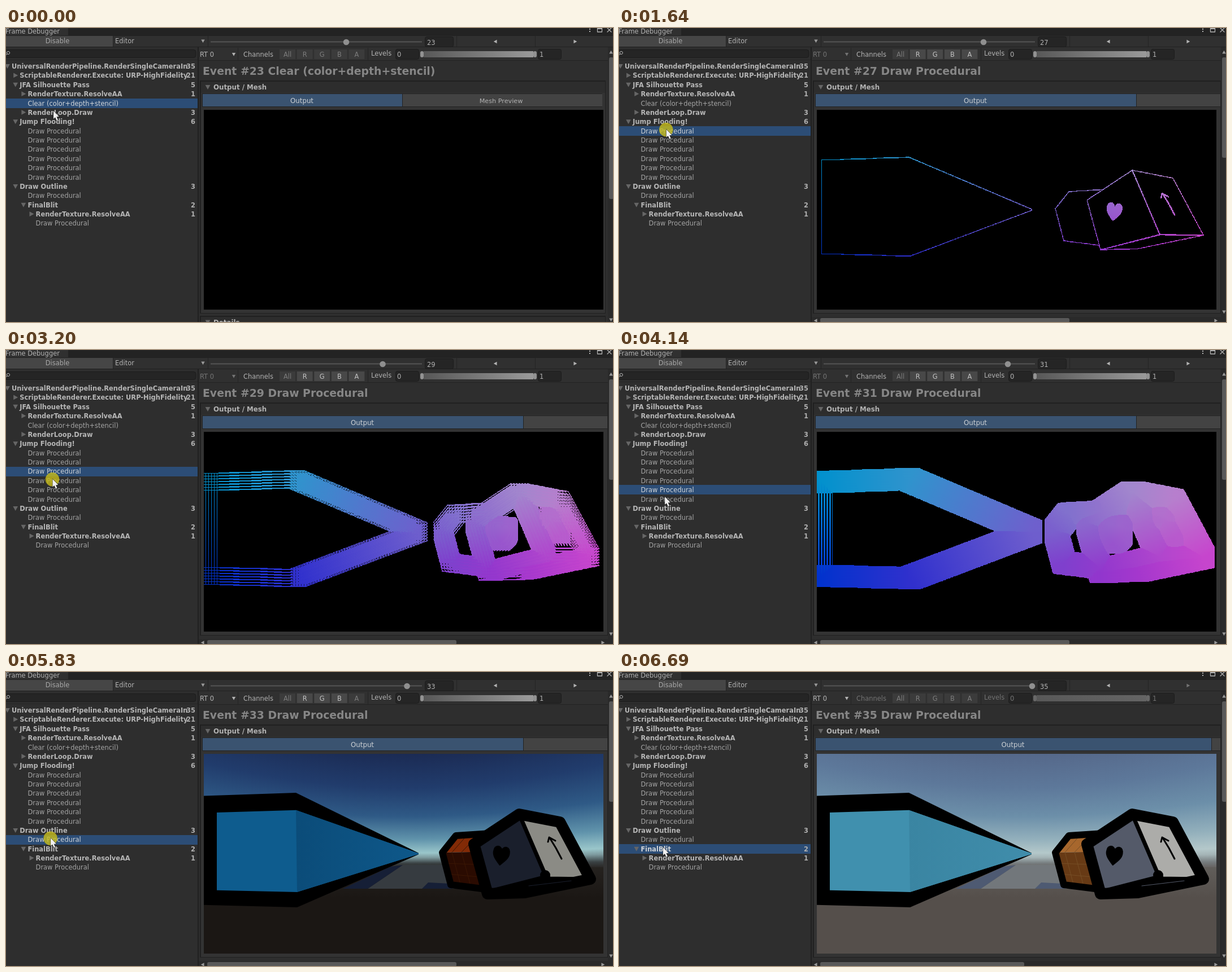
Write an HTML page with a canvas that moves like this. It is 1074 px wide and 521 px high and loops after 7920 ms.

```html
<!DOCTYPE html>
<html lang="en">
<head>
<meta charset="utf-8">
<title>Frame Debugger</title>
<style>
html, body { margin: 0; width: 100%; height: 100%; overflow: hidden; background: #2d2d2d; }
canvas { display: block; width: 1074px; height: 521px; }
</style>
</head>
<body>
<canvas id="stage" width="1074" height="521"></canvas>
<script>
const g = document.getElementById('stage').getContext('2d');
const LOOP = 7920;
const VIEW = { x: 350, y: 145, w: 707, h: 354 };
const ZOOM = 1.6;                                   // texels per stage pixel
const TW = Math.round(VIEW.w * ZOOM), TH = Math.round(VIEW.h * ZOOM);
const INK = '#b2b2b2', DIM = '#737373', FIELD = '#252525', EDGE = '#1c1c1c';

// ---------- helpers ----------
function rect(x, y, w, h, c) { g.fillStyle = c; g.fillRect(x, y, w, h); }
function round(x, y, w, h, r, c, line) {
  g.beginPath(); g.roundRect(x, y, w, h, r);
  g.fillStyle = c; g.fill();
  if (line) { g.strokeStyle = line; g.lineWidth = 1; g.stroke(); }
}
function text(s, x, y, c = INK, bold = false, size = 11.45, align = 'left') {
  g.font = `${bold ? 'bold ' : ''}${size}px "DejaVu Sans", sans-serif`;
  g.textAlign = align; g.fillStyle = c;
  g.fillText(s, x, y);
}
function path(c, pts, close) {
  c.beginPath();
  pts.forEach(p => c.lineTo(...p));
  if (close) c.closePath();
}
function fill(pts, color) { path(g, pts, true); g.fillStyle = color; g.fill(); }
function line(c, pts, color, w) {
  path(c, pts);
  c.strokeStyle = color; c.lineWidth = w; c.lineCap = c.lineJoin = 'round';
  c.stroke();
}
function disc(x, y, r, c) {
  g.beginPath(); g.arc(x, y, r, 0, 7);
  g.fillStyle = c; g.fill();
}
function tri(x, y, dir, c = '#9a9a9a', r = 3.3) {
  const a = ['right', 'down', 'left', 'up'].indexOf(dir) * Math.PI / 2;
  const at = (k, turn) => [x + k * r * Math.cos(a + turn), y + k * r * Math.sin(a + turn)];
  fill([at(1, 0), at(1.25, 2.25), at(1.25, -2.25)], c);
}
function ramp(x0, y0, x1, y1, stops) {
  const l = g.createLinearGradient(x0, y0, x1, y1);
  stops.forEach(([p, c]) => l.addColorStop(p, c));
  return l;
}
const clamp = v => Math.max(0, Math.min(1, v));

// ---------- shapes in the view ----------
const TIP = 322;
const CONE = [[358, 234], [513, 229], [730, 321], [730, 323], [515, 404], [358, 400]];
const BOX = [[908, 252], [980, 266], [1034, 367], [918, 391], [852, 393], [828, 305]];
const SMALL = [[857, 286], [796, 290], [772, 320], [787, 377], [850, 385]];
const CORNER = [957, 366];
const loop = pts => [...pts, pts[0]];

function heart(c, color, grow = 0) {
  c.save();
  c.translate(876, 325); c.rotate(.14);
  c.beginPath(); c.moveTo(0, 17);
  for (const s of [-1, 1]) {
    c.moveTo(0, 17);
    c.bezierCurveTo(s * 8, 9, s * 14, 3, s * 14, -5);
    c.bezierCurveTo(s * 14, -18, s * 2, -18, 0, -9);
  }
  c.fillStyle = c.strokeStyle = color; c.fill();
  if (grow) { c.lineWidth = grow; c.stroke(); }
  c.restore();
}
function arrow(c, color, w) {
  line(c, [[983, 331], [973, 312], [962, 294]], color, w);
  line(c, [[959, 301], [961, 293], [972, 299]], color, w);
}
function edges(c, color, w) {
  line(c, [BOX[0], CORNER, BOX[2]], color, w);
  line(c, [CORNER, BOX[4]], color, w);
}

// ---------- jump flooding ----------
function texture() {
  const cv = document.createElement('canvas');
  cv.width = TW; cv.height = TH;
  return cv;
}
function seedField() {
  const c = texture().getContext('2d', { willReadFrequently: true });
  c.setTransform(ZOOM, 0, 0, ZOOM, -VIEW.x * ZOOM, -VIEW.y * ZOOM);
  line(c, CONE, '#fff', 1.4);
  [SMALL, loop(BOX)].forEach(s => line(c, s, '#fff', 1.4));
  edges(c, '#fff', 2);
  heart(c, '#fff');
  arrow(c, '#fff', 2.6);
  c.resetTransform();
  c.fillRect(13, 142, 1, 266);
  const px = c.getImageData(0, 0, TW, TH).data;
  return Int32Array.from({ length: TW * TH }, (_, i) => px[i * 4 + 3] > 110 ? i : -1);
}
function jump(src, step) {
  const out = new Int32Array(TW * TH);
  for (let y = 0, i = 0; y < TH; y++) for (let x = 0; x < TW; x++, i++) {
    let best = -1, near = Infinity;
    for (let v = y - step; v <= y + step; v += step) {
      if (v < 0 || v >= TH) continue;
      for (let u = x - step; u <= x + step; u += step) {
        if (u < 0 || u >= TW) continue;
        const s = src[v * TW + u];
        if (s < 0) continue;
        const sy = (s / TW) | 0, dx = s - sy * TW - x, dy = sy - y, d = dx * dx + dy * dy;
        if (d < near) { near = d; best = s; }
      }
    }
    out[i] = best;
  }
  return out;
}
// colour of a texel = position of its nearest seed
function paint(field) {
  const cv = texture(), c = cv.getContext('2d');
  const img = c.createImageData(TW, TH), d = img.data;
  field.forEach((s, i) => {
    if (s < 0) return;
    const k = i * 4;
    d[k] = 205 * (s % TW) / TW;
    d[k + 1] = 195 - 201 * Math.floor(s / TW) / TH;
    d[k + 2] = 205;
    d[k + 3] = 255;
  });
  c.putImageData(img, 0, 0);
  return cv;
}
let field = seedField();
const flood = [paint(field)];
for (let step = 16; step >= 1; step /= 2) flood.push(paint(field = jump(field, step)));

// ---------- outlined scene ----------
function tone(hex, lit) {
  const rgb = [1, 3, 5].map(i => parseInt(hex.slice(i, i + 2), 16));
  return `rgb(${rgb.map(c => Math.round(lit ? 20.6 * c ** .43 : c))})`;
}
const SKY = [[0, '#1b2b54'], [.3, '#213c6c'], [.55, '#2f5a86'], [.75, '#6093ab'],
  [.87, '#9ac6ca'], [.91, '#7d9a9e'], [.96, '#3a4143'], [1, '#282523']];

function sky(lit) {
  const stops = SKY.map(([p, c]) => [p, tone(c, lit)]), mid = VIEW.x + VIEW.w / 2;
  for (let x = VIEW.x; x < VIEW.x + VIEW.w; x += 7) {
    const rise = 202 * Math.hypot(1, (x - mid) / 420);   // wide lens bends the bands
    rect(x, VIEW.y, 7, 202, ramp(0, 347 - rise, 0, 347, stops));
  }
}
function scene(lit) {
  const c = hex => tone(hex, lit);
  sky(lit);
  rect(350, 346, 707, 153, ramp(0, 346, 0, 400, [[0, c('#25221f')], [1, c('#1b1714')]]));
  fill([[702, 342], [780, 342], [800, 384], [640, 384]], c('#363b40'));
  fill([[702, 342], [640, 384], [596, 384], [680, 345]], c('#161f36'));
  fill([[736, 384], [747, 373], [785, 375], [790, 384]], c('#161f36'));

  // the cone's outline narrows toward its tip
  const taper = k => CONE.map(([x, y]) => [x, TIP + (y - TIP) * k]);
  const outer = taper(1.16), inner = taper(.83);
  outer[0][0] = outer[5][0] = 340;
  inner[0][0] = inner[5][0] = 373;
  fill(outer, '#000');
  fill(inner, c('#0e5c8e'));
  fill(inner.slice(1, 5), ramp(513, 0, 729, 0, [[0, c('#0b4c79')], [1, c('#0e588a')]]));

  const notch = [823, 319], foot = [841, 385];
  fill([...SMALL.slice(0, 3), notch], c('#822a06'));
  fill([SMALL[2], notch, foot, SMALL[3]], c('#2a0b01'));
  const mix = (a, b, k) => a.map((v, i) => v + (b[i] - v) * k);
  for (const k of [1 / 3, 2 / 3]) {
    line(g, [mix(SMALL[2], SMALL[3], k), mix(notch, foot, k)], c('#3a1604'), 1);
    line(g, [mix(SMALL[1], SMALL[0], k), mix(SMALL[2], notch, k), mix(SMALL[3], foot, k)], c('#3a1604'), 1);
  }
  line(g, loop(SMALL), '#000', 12);

  fill(BOX, '#000');
  fill([BOX[0], CORNER, BOX[4], BOX[5]], c('#1a1f2c'));
  fill([BOX[0], BOX[1], BOX[2], CORNER], c('#8b8b85'));
  line(g, loop(BOX), '#000', 20);
  edges(g, '#000', 7);
  line(g, [BOX[4], CORNER], '#000', 14);
  disc(954, 360, 9, '#000');
  line(g, [[925, 379], [1000, 370]], c('#1a1f2c'), 1.2);
  heart(g, '#000', 2);
  arrow(g, '#000', 3);
}
function mask() {
  [CONE, SMALL, BOX].forEach(s => fill(s, '#fff'));
  edges(g, '#000', 1.5);
  line(g, [BOX[0], BOX[5], BOX[4]], '#000', 1.5);
  heart(g, '#000');
  arrow(g, '#000', 2.6);
}

// ---------- tree: "-" open, "+" closed, indent = depth ----------
const passes = '  Draw Procedural\n'.repeat(6);
const ROWS = `-UniversalRenderPipeline.RenderSingleCameraIn 35
 +ScriptableRenderer.Execute: URP-HighFidelity 21
 -JFA Silhouette Pass 5
  +RenderTexture.ResolveAA 1
  Clear (color+depth+stencil)
  +RenderLoop.Draw 3
 -Jump Flooding! 6
${passes} -Draw Outline 3
  Draw Procedural
  -FinalBlit 2
   +RenderTexture.ResolveAA 1
   Draw Procedural`.split('\n').map(row => {
  const [, pad, fold, name, count] = row.match(/^( *)([-+]?)(.*?)(?: (\d+))?$/);
  return { depth: pad.length, fold, name, count };
});
// each row shows its last event; only leaves and closed groups advance the total
let total = 0;
for (const r of ROWS) {
  r.id = total + Number(r.count || 1);
  if (r.fold !== '-') total = r.id;
}
const rowY = i => 68 + 16.38 * i;

function tree(sel) {
  g.save();
  g.beginPath(); g.rect(0, 57, 339, 464); g.clip();
  ROWS.forEach(({ depth, fold, name, count }, i) => {
    const y = rowY(i), x = 10 + 14.2 * depth, on = i === sel;
    if (on) rect(0, Math.round(y - 8.7), 339, 17, '#2c4d76');
    if (fold) tri(x - 7.5, y - .5, fold === '-' ? 'down' : 'right', '#666', 4.5);
    const base = Math.round(y + 4);
    text(name, x, base, on ? '#d0d4d8' : fold ? '#b6b6b6' : '#a4a4a4', !!fold);
    if (count) text(count, 335, base, '#b0b0b0', true, 11.45, 'right');
  });
  g.restore();
}

// ---------- clicks: time, row, delay of the selection ----------
const CLICKS = [[0, 4], [670, 5], [1640, 7], [2050, 8], [2650, 9], [3200, 10, 80],
  [3740, 11], [4270, 12], [5830, 14], [6560, 15]];

function chrome() {
  rect(0, 0, 1074, 521, '#2e2e2e');
  rect(0, 0, 1074, 13, '#232323');
  rect(0, 0, 110, 13, '#303030');
  text('Frame Debugger', -1, 10);
  [2, 6].forEach(y => rect(1032, y - 1, 2, 2, INK));
  g.strokeStyle = INK; g.lineWidth = 1.3;
  g.strokeRect(1046.5, 0, 8, 7);
  rect(1046, 0, 9, 2, INK);
  line(g, [[1064, 0], [1071, 7]], INK, 1.3);
  line(g, [[1071, 0], [1064, 7]], INK, 1.3);
  rect(0, 13, 1074, 21, '#212121');
  rect(0, 14, 1074, 19, '#303030');
  rect(0, 14, 189, 19, '#464646');
  text('Disable', 91, 27, '#a8a8a8', false, 11.45, 'center');
  text('Editor', 193, 27);
  tri(348.5, 23, 'down');
  [189, 357, 797, 936].forEach(x => rect(x, 14, 1, 19, '#242424'));
  round(-6, 38.5, 342, 14, 4, FIELD, EDGE);
  g.strokeStyle = INK;
  g.beginPath(); g.arc(4, 44, 2.6, 0, 7); g.moveTo(2, 46); g.lineTo(-1, 49); g.stroke();
  rect(0, 56, 339, 1, '#262626');
  rect(339, 34, 2, 487, '#202020');
  rect(341, 34, 733, 23, '#303030');
  rect(341, 57, 724, 1, '#232323');
}

function toolbar(id) {
  const last = id === 35, tex = id > 26 && id < 33;
  rect(362, 23.5, 374, 2, '#545454');
  disc(602 + 10.75 * (id - 23), 25, 5.3, '#8f8f8f');
  round(741.5, 15.5, 50, 18, 3, FIELD, EDGE);
  text(id, 745, 30);
  tri(866, 24, 'left', INK);
  tri(1007, 24, 'right', last ? DIM : INK);

  text('RT 0', 343, 51, tex ? DIM : INK);
  tri(403, 46.5, 'down', tex ? DIM : INK);
  [410, 640].forEach(x => rect(x, 35, 1, 22, FIELD));
  const ink = last ? DIM : INK;
  text('Channels', 420, 51, ink);
  [...['All', 'R', 'G', 'B', 'A'].entries()].forEach(([i, s]) => {
    const on = !last && id !== 23 && i > 0 && (i < 4 || tex), x = 484 + i * 30.6;
    rect(x, 38, 28, 17, on ? '#484848' : '#3b3b3b');
    text(s, x + 14, 51, on ? '#c2c2c2' : '#7d7d7d', false, 11.45, 'center');
  });
  text('Levels', 646, 49, ink);
  [689, 941].forEach((x, i) => {
    round(x + .5, 37.5, 41, 18, 3, FIELD, EDGE);
    text(i, x + 3, 51, ink);
  });
  const cap = last ? '#686868' : '#929292';
  rect(739, 41, 194, 11, ramp(739, 0, 933, 0, [[0, '#585858'], [1, last ? '#646464' : '#9a9a9a']]));
  [733, 933].forEach(x => round(x, 41, 6, 11, 3, cap));
}

function output(id) {
  rect(VIEW.x, VIEW.y, VIEW.w, VIEW.h, '#000');
  g.save();
  g.beginPath(); g.rect(VIEW.x, VIEW.y, VIEW.w, VIEW.h); g.clip();
  g.imageSmoothingEnabled = false;
  if (id > 32) scene(id === 35);
  else if (id > 26) g.drawImage(flood[id - 27], VIEW.x, VIEW.y, VIEW.w, VIEW.h);
  else if (id === 26) mask();
  g.restore();
}

function panel(id) {
  const wide = id > 23, last = id === 35;      // wide content scrolls sideways
  const tab = last ? 1048 : wide ? 915 : 701;
  const right = wide ? 1065 : 1061, end = wide ? 1064 : 1055;
  const name = id === 26 ? 'Draw Mesh' : ROWS.findLast(r => r.id === id).name;
  text(`Event #${id} ${name}`, 348, 82.5, '#868686', true, 18.85);

  rect(343, 93, right - 343, 413, '#202020');
  rect(345, 95, right - 346, 410, '#333');
  rect(345, 95, right - 346, 20, '#2d2d2d');
  tri(357, 104.5, 'down', '#666', 4.5);
  text('Output / Mesh', 367, 109, INK, true, 11.8);
  rect(347, 116, end - 347, 24, '#222');
  rect(348, 117, tab - 348, 22, '#3a5370');
  rect(tab + 1, 117, end - tab - 1, 22, '#434343');
  text('Output', (348 + tab) / 2 - 1, 133, '#ccd0d4', false, 11.8, 'center');
  if (!wide) text('Mesh Preview', 876, 133, INK, false, 11.2, 'center');
  output(id);

  rect(1065, 34, 9, 487, '#2a2a2a');
  tri(1070.5, 43, 'up');
  round(1067, 52, 8, wide ? 178 : 251, 3, '#595959');
  tri(1070.5, wide ? 503 : 517, 'down');
  if (wide) {
    rect(341, 512, 733, 9, '#2a2a2a');
    round(356, 514, last ? 361 : 441, 8, 3, '#595959');
    tri(348, 518.5, 'left');
    tri(1056, 518.5, 'right');
  } else {
    rect(343, 510, right - 343, 11, '#202020');
    rect(345, 512, right - 346, 9, '#2d2d2d');
    tri(357, 521, 'down', '#666', 4.5);
    text('Details', 367, 526, INK, true, 11.8);
  }
}

// the pointer rests on a row, clicks, then eases to the next row
function pointer(t) {
  const spot = row => [84 - .06 * (row - 5) ** 2, rowY(row) - 3];
  const i = CLICKS.findLastIndex(c => c[0] <= t);
  const [time] = CLICKS[i], next = CLICKS[i + 1] || CLICKS[i];
  const [x0, y0] = spot(CLICKS[Math.max(i, 1)][1]), [x1, y1] = spot(next[1]);
  const travel = Math.max(1, Math.min(320, next[0] - time - 200));
  let k = clamp((t - time - 140) / travel);
  k *= k * (3 - 2 * k);
  const x = x0 + (x1 - x0) * k, y = y0 + (y1 - y0) * k;

  if (i > 0 && t - time < 130) {
    g.globalAlpha = .8 * clamp((130 - t + time) / 60);
    disc(x - .5, y + .5, 12.3, '#c8bd1c');
    g.globalAlpha = 1;
  }
  g.save();
  g.translate(x, y);
  path(g, [[0, 0], [0, 14], [3, 11.3], [5.6, 17], [8, 16], [5.6, 10.4], [9.8, 10.2]], true);
  g.strokeStyle = 'rgba(20,20,20,.7)'; g.lineWidth = 1.2;
  g.stroke();
  g.fillStyle = '#f0f0f0'; g.fill();
  g.restore();
}

function draw(t) {
  const [, row] = CLICKS.findLast(([time, , lag = 0]) => time + lag <= t);
  const { id } = ROWS[row];
  chrome();
  tree(row);
  toolbar(id);
  panel(id);
  pointer(t);
}
const start = performance.now();
function tick() {
  draw((performance.now() - start) % LOOP);
  requestAnimationFrame(tick);
}
tick();
</script>
</body>
</html>
```
